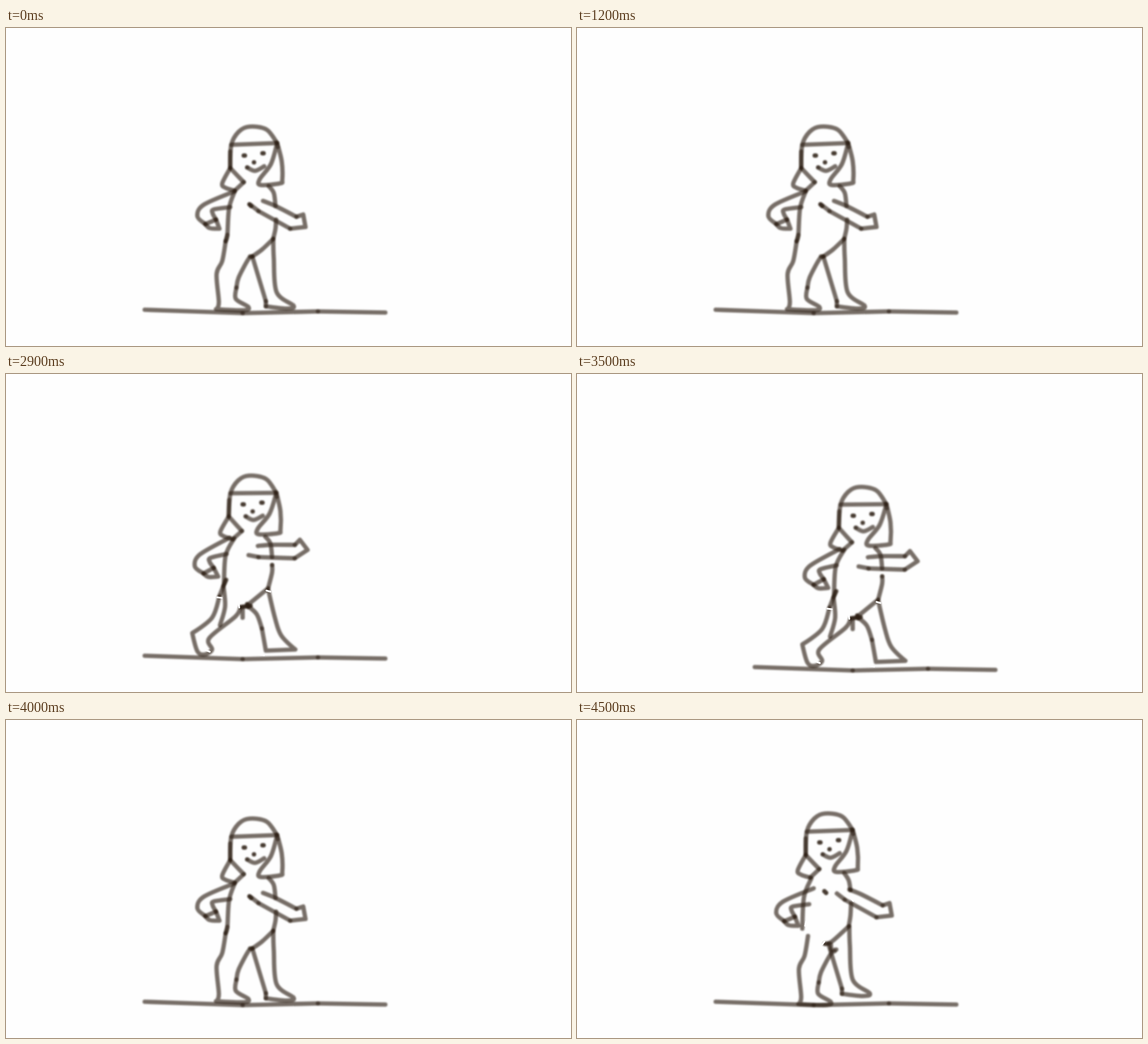
Animation, 998 px wide and 561 px high, one loop 5000 ms. Source, as an HTML page:

```html
<!DOCTYPE html>
<html lang="en">
<head>
<meta charset="utf-8">
<title>Walking sketch</title>
<style>
  html, body { margin: 0; width: 100%; height: 100%; overflow: hidden; background: #fefefe; }
  svg { display: block; width: 998px; height: 561px; }
  path { fill: none; stroke-linecap: round; stroke-linejoin: round; }
  .ink path { stroke: #2d1f14; stroke-opacity: .65; stroke-width: 7.6; }
  .rub path { stroke: #fefefe; stroke-width: 3; }
</style>
</head>
<body>
<svg viewBox="0 0 998 561">
  <defs>
    <filter id="soft" filterUnits="userSpaceOnUse" x="0" y="0" width="998" height="561" color-interpolation-filters="sRGB">
      <feGaussianBlur stdDeviation="1.8"/>
    </filter>
  </defs>
  <g id="stage"></g>
</svg>
<script>
// One smooth brush stroke through key points; "!" marks a corner, a lone point is a dab.
function stroke(text) {
  const p = text.trim().split(' ').map(s => ({ xy: s.split(',').map(parseFloat), sharp: s.endsWith('!') }));
  const slope = i => {
    if (p[i].sharp) return [0, 0];
    const a = (p[i - 1] || p[i]).xy, b = (p[i + 1] || p[i]).xy;
    return [(b[0] - a[0]) / 6, (b[1] - a[1]) / 6];
  };
  let d = `M${p[0].xy}h.1`;
  for (let i = 1; i < p.length; i++) {
    const [a, b] = [p[i - 1].xy, p[i].xy];
    const [s, e] = [slope(i - 1), slope(i)];
    d += `C${a[0] + s[0]},${a[1] + s[1]} ${b[0] - e[0]},${b[1] - e[1]} ${b}`;
  }
  return `<path d="${d}"/>`;
}

// Strokes are parted by "/"; where their ends meet, the ink darkens by itself.
const sketch = text => text.split('/').map(stroke).join('');
const move = (x, y, art, turn = 0, cx = 0, cy = 0) =>
  `<g transform="translate(${x} ${y}) rotate(${turn} ${cx} ${cy})">${art}</g>`;

const ground = sketch('245,497 418,503 / 418,503 551,500 / 551,500 670,502');

const eye = (x, y) => sketch(`${x - 1},${y} ${x + 1},${y}`).repeat(2);
const face = eye(421, 225) + eye(454, 221) + sketch('438,237 / 438,237 / 426,246 / 426,246 440,252 456,244');
const hair = sketch(`396,246 398,206 411,183 430,174 460,179 479,203 /
  398,206 479,203 / 396,218 396,247 / 396,247 420,272 / 420,272 404,287 /
  396,247 382,274 388,282 404,287 / 478,202 480,210 /
  479,203 468,240 448,267 450,277 484,274 488,268 487,235 479,203`.replace(/\s+/g, ' '));
const head = hair + face;

const backArm = sketch('404,288 349,312 338,332 352,346 / 352,346 371,338 / 396,316 367,320 365,327 371,338 / 371,338 377,354! 360,353 352,346');
const frontArm = sketch('454,305 476,314 513,333 / 513,333 525,329! 529,351! 502,354 / 502,354 446,323 / 446,323 432,312');
const backLeg = sketch('388,376 382,411 372,434 376,484 371,496! 420,498 428,492 406,478 407,458 / 407,458 411,440 428,408 435,403');
const frontLeg = sketch('472,372 473,406 478,466 508,490 495,495 459,491 / 435,403 459,482 / 459,482 459,491');
const dab = sketch('430,311 433,314').repeat(2);

const striding = {
  ink: ground + head + backArm + frontArm + backLeg + frontLeg + dab +
    sketch('404,288 394,318 391,365 388,376 / 391,365 388,376 / 464,279 473,291 476,314 / 477,338 476,354 472,372 / 435,403 452,391 472,372 / 431,403 435,403')
};

const stretched = {
  ink: ground + move(-2, 5.5, head, 1.6, 438, 225) +
    move(-4, 4, backArm, -6, 371, 338) + move(0, 0, frontArm, -27, 446, 323) +
    sketch('403,290 388,320 385,370 / 389,363 384,374 / 388,364 377,392 / 377,392 364,430 329,457! 338,489 350,495 364,486 359,466 405,428 414,412') +
    sketch('384,374 387,410 378,443 / 418,411 418,430 / 425,409 463,378 / 458,287 467,299 470,323 / 470,337 / 470,337 470,350 463,378') +
    sketch('463,380 475,430 486,461 511,486! 459,488! 452,449 / 452,449 443,424 427,409') +
    sketch('415,411 432,409 / 426,406 428,411').repeat(2),
  rub: sketch('345,484 360,490 / 373,394 381,395 / 411,404 412,412 / 460,382 467,384 / 444,494 456,496')
};

const shifted = { ink: move(69, 20, stretched.ink), rub: move(69, 20, stretched.rub) };

const lifted = {
  ink: ground + move(8, -9, head) + move(14, 9, backArm) + move(27, -6, frontArm) +
    move(20, 5, backLeg) + move(9, -8, frontLeg) + move(7, -9, dab) +
    sketch('414,279 401,312 398,368 / 472,270 480,283 483,300 / 483,300 / 484,324 483,345 480,364 / 438,395 450,391 480,364 / 438,395 448,395 449,405 458,405'),
  rub: sketch('433,396 437,391 / 405,355 403,363 / 482,311 488,319')
};

// [end time in ms, pose]
const timeline = [[2000, striding], [3500, stretched], [4000, shifted], [4500, striding], [5000, lifted]];
const stage = document.getElementById('stage');
let shown = null;

function draw(ms) {
  const t = ms % 5000;
  const pose = timeline.find(([end]) => t < end)[1];
  if (pose === shown) return;
  shown = pose;
  stage.innerHTML = `<g class="ink" filter="url(#soft)">${pose.ink}</g><g class="rub">${pose.rub || ''}</g>`;
}

const start = performance.now();
function tick() {
  draw(performance.now() - start);
  requestAnimationFrame(tick);
}
tick();
</script>
</body>
</html>
```
